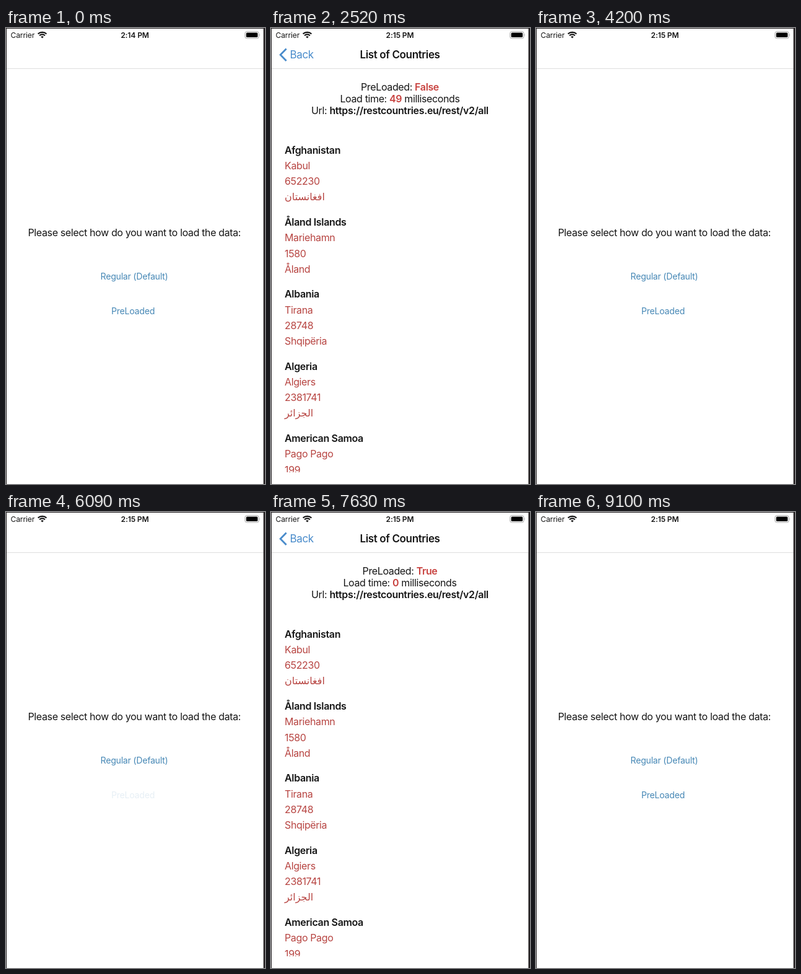
An HTML page for the animation above (9.38 s loop, 418 px wide and 736 px high).

```html
<!DOCTYPE html>
<html lang="en">
<head>
<meta charset="utf-8">
<style>
  html, body { margin: 0; width: 100%; height: 100%; overflow: hidden; background: #fff; }
  svg { display: block; width: 418px; height: 736px; }
  text { font: 16px Inter, "DejaVu Sans", sans-serif; font-optical-sizing: none; letter-spacing: -.37px; fill: #151515; }
  .mid { text-anchor: middle; }
  .bold { font-weight: 600; letter-spacing: -.34px; }
  .red { fill: #b74441; }
  .hot { fill: #c8423f; font-weight: 600; }
  .arabic { letter-spacing: 0; }
  .link { font-size: 14px; letter-spacing: -.19px; fill: #4587b5; }
  .bar { font-size: 17px; letter-spacing: -.36px; }
  .status { font-size: 12px; letter-spacing: -.1px; }
  #back { fill: #4a8ccb; }
</style>
</head>
<body>
<svg viewBox="0 0 418 736">
  <clipPath id="view"><path d="M0 66H415V717H0Z"/></clipPath>
  <rect width="418" height="736" fill="#fff"/>

  <g id="menu">
    <text class="mid" x="207.2" y="335.6">Please select how do you want to load the data:</text>
    <text class="mid link" id="regular" x="207" y="406">Regular (Default)</text>
    <text class="mid link" id="preloaded" x="205" y="462">PreLoaded</text>
  </g>
  <rect id="dim" y="65" width="418" height="671"/>

  <g id="list">
    <rect x="1" y="65" width="414" height="671" fill="#fff"/>
    <g id="rows" clip-path="url(#view)">
      <text class="mid" x="208" y="100.5">PreLoaded: <tspan class="hot" id="flag"></tspan></text>
      <text class="mid" x="208" y="119.5">Load time: <tspan class="hot" id="ms"></tspan> milliseconds</text>
      <text class="mid" x="208" y="138.5">Url: <tspan class="bold">https://restcountries.eu/rest/v2/all</tspan></text>
    </g>
  </g>

  <rect width="418" height="65" fill="#fff"/>
  <path d="M0 65.5H416" stroke="#dedede"/>
  <path id="chevron" d="M24.7 33.6L15.2 43.3L24.7 53" fill="none" stroke="#4a8ccb" stroke-width="2.8"/>
  <text class="bar" id="back" x="30.5" y="49">Back</text>
  <text class="bar bold mid" id="title" x="208" y="49">List of Countries</text>

  <text class="status" x="7.5" y="15.8">Carrier</text>
  <text class="status bold mid" id="clock" x="208" y="15.8"></text>
  <g fill="none" stroke="#111" stroke-width="2.1">
    <path d="M51.6 9.6A10 10 0 0 1 65.4 9.6M54.1 12.2A6.3 6.3 0 0 1 62.9 12.2"/>
    <path d="M56.1 14.1Q58.5 12.3 60.9 14.1L58.5 16.6Z" fill="#111" stroke="none"/>
  </g>
  <rect x="385.8" y="5.8" width="22.2" height="11" rx="2.8" fill="none" stroke="#a4a4a4"/>
  <rect x="387.6" y="7.6" width="18.6" height="7.4" rx="1.5" fill="#000"/>
  <path d="M409.3 9.6Q411 11.3 409.3 13Z" fill="#a4a4a4"/>

  <path d="M0 0H418V736H415.5V1H1V736H0Z" fill="#232021"/>
</svg>
<script>
const LOOP = 9380, STEP = 70, WIDTH = 414;
const $ = id => document.getElementById(id);
const clamp = v => Math.min(1, Math.max(0, v));

const countries = [
  ["Afghanistan", "Kabul", "652230", "افغانستان"],
  ["Åland Islands", "Mariehamn", "1580", "Åland"],
  ["Albania", "Tirana", "28748", "Shqipëria"],
  ["Algeria", "Algiers", "2381741", "الجزائر"],
  ["American Samoa", "Pago Pago", "199"]
];
countries.forEach((lines, i) => lines.forEach((line, j) => {
  const el = document.createElementNS("http://www.w3.org/2000/svg", "text");
  const arabic = /[\u0600-\u06ff]/.test(line);
  el.setAttribute("x", 22);
  el.setAttribute("y", 202.7 + i * 116.3 + j * 25.3 - (arabic ? 1 : 0));
  el.setAttribute("class", arabic ? "red arabic" : j ? "red" : "bold");
  el.textContent = line;
  $("rows").append(el);
}));

const visits = [
  { press: 1260, push: 1326, pop: 3040, span: 950, button: "regular", flag: "False", ms: 49 },
  { press: 6090, push: 6200, pop: 8360, span: 740, button: "preloaded", flag: "True", ms: 0 }
];

// How far the list is off screen: 0 fully shown, 1 fully hidden.
function hidden(t, v) {
  if (t < v.push) return 1;
  if (t >= v.pop) return clamp((t - v.pop) / v.span) ** 1.82;
  const x = (t - v.push) * .01397;
  const rest = (1 + x) * Math.exp(-x);
  return rest < .001 ? 0 : rest;
}

const shift = (id, x) => $(id).setAttribute("transform", `translate(${x.toFixed(2)} 0)`);
const fade = (id, a) => $(id).setAttribute("opacity", a.toFixed(3));

function draw(t) {
  const visit = visits[t < 5000 ? 0 : 1];
  const off = hidden(t, visit), shown = 1 - off;

  shift("list", WIDTH * off);
  shift("menu", -.3 * WIDTH * shown);
  shift("title", .58 * WIDTH * off);
  shift("back", .107 * WIDTH * off);
  fade("title", shown);
  fade("back", shown ** 2);
  fade("chevron", shown ** 1.5);
  fade("dim", .08 * shown ** 3);

  for (const v of visits)
    fade(v.button, t < v.press ? 1 : .13 + .87 * clamp((t - v.push) / 250));

  $("flag").textContent = visit.flag;
  $("ms").textContent = visit.ms;
  $("clock").textContent = t < 1050 ? "2:14 PM" : "2:15 PM";
}

function tick() {
  draw(Math.floor(performance.now() % LOOP / STEP) * STEP);
  requestAnimationFrame(tick);
}
tick();
</script>
</body>
</html>
```
